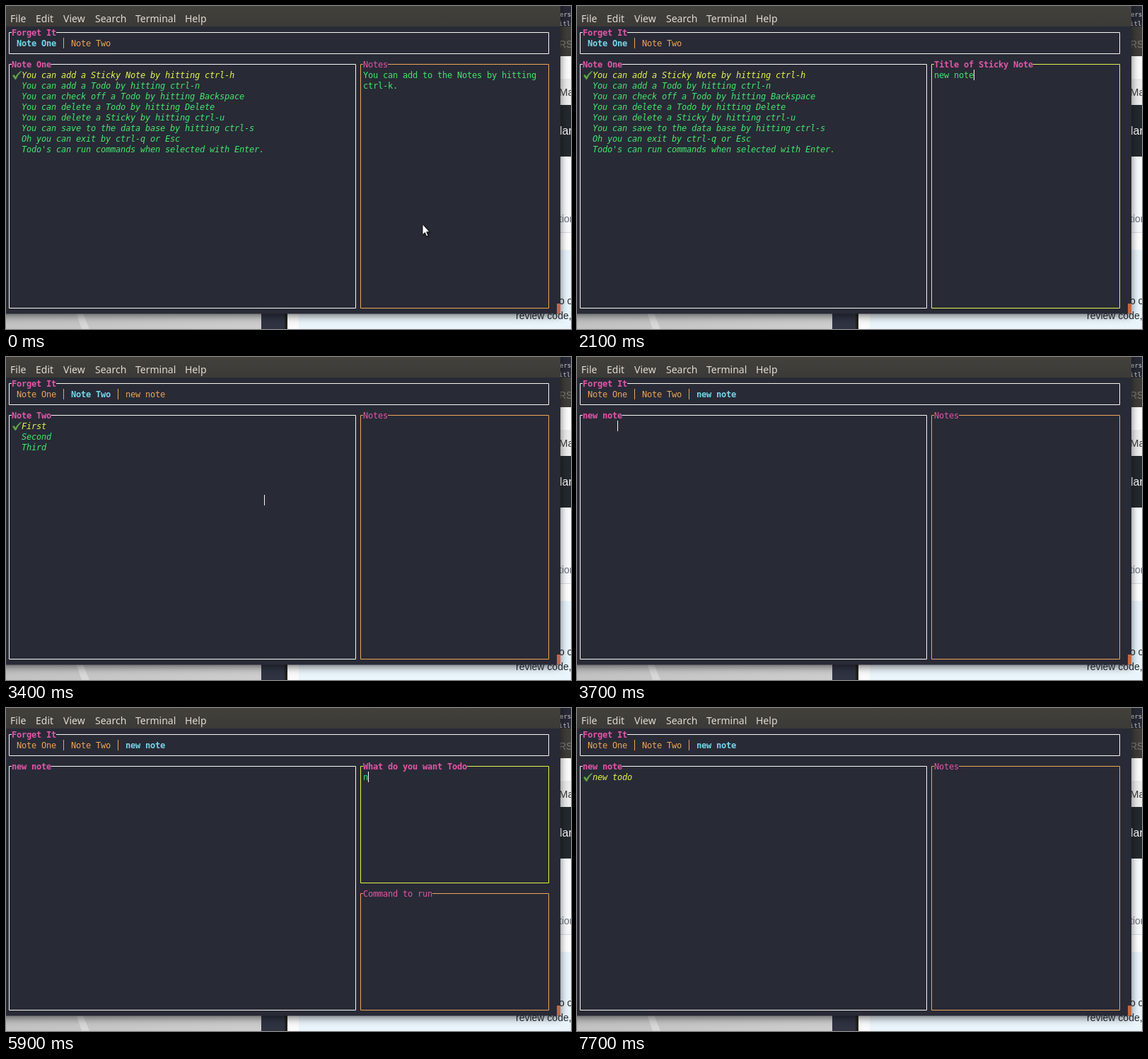
Write an HTML page that moves like this. It is 799 px wide and 457 px high and loops after 8 s.

```html
<!DOCTYPE html>
<html lang="en">
<head>
<meta charset="utf-8">
<title>Sticky notes in a terminal</title>
<style>
  html, body { margin: 0; width: 100%; height: 100%; overflow: hidden; background: #282a36; }
  svg { display: block; width: 799px; height: 457px; }
  text { white-space: pre; }
  .term text {
    font: 12px "DejaVu Sans Mono", monospace;
    letter-spacing: calc(7px - 1ch);
  }
  .term .b { font-weight: bold; }
  .term .i { font-style: italic; }
  .menu text { font: 14px "Noto Sans", "Open Sans", sans-serif; fill: #dfdbd2; }
  .page text { font: 14px "Liberation Sans", sans-serif; }
  .page .code { font: 9px "DejaVu Sans Mono", monospace; fill: #d5d5d0; }
  .win { filter: drop-shadow(0 3px 6px rgba(0, 0, 0, .55)); }
</style>
</head>
<body>
<svg viewBox="0 0 799 457">
  <defs>
    <linearGradient id="desk"><stop stop-color="#c2c2c2"/><stop offset="1" stop-color="#cdcdcd"/></linearGradient>
    <linearGradient id="bar" x2="0" y2="1"><stop stop-color="#42413c"/><stop offset="1" stop-color="#3b3a36"/></linearGradient>
  </defs>

  <g class="page">
    <rect y="430" width="361" height="27" fill="url(#desk)"/>
    <path d="M98 430h9l11 27h-11z" fill="#d8d8d8"/>
    <rect x="361" y="430" width="35" height="27" fill="#2f3342"/>
    <rect x="394" y="430" width="4" height="27" fill="#22231f"/>
    <rect x="398" y="430" width="16" height="27" fill="#fafafa"/>
    <rect x="414" y="345" width="385" height="112" fill="#eaf4fb"/>
    <rect x="770" width="29" height="29" fill="#272a36"/>
    <rect x="770" y="29" width="29" height="42" fill="#3e3d39"/>
    <rect x="770" y="71" width="29" height="32" fill="#fbfbfb"/>
    <rect x="770" y="103" width="29" height="37" fill="#ededed"/>
    <rect x="770" y="140" width="29" height="73" fill="#24292e"/>
    <rect x="770" y="213" width="29" height="108" fill="#f8fafc"/>
    <rect x="770" y="320" width="29" height="1" fill="#d8dce0"/>
    <rect x="770" y="321" width="29" height="24" fill="#fff"/>
    <text class="code" x="783" y="15">ers</text>
    <text class="code" x="782" y="28">itle</text>
    <text x="782" y="59" fill="#7d7b74">RS:</text>
    <text x="782" y="127" fill="#3c3c3c" style="font-size:15px">Ma</text>
    <text x="783" y="182" fill="#fff" style="font-size:16px">lan</text>
    <text x="782" y="306" fill="#6a737d">tion</text>
    <text x="778" y="422" fill="#24292e">to of</text>
    <text x="721" y="443" fill="#24292e">review code,</text>
  </g>

  <rect class="win" x="-20" y="-20" width="804" height="455.5" fill="#282a36"/>
  <rect width="784" height="29" fill="url(#bar)"/>
  <rect x="779" y="421" width="5" height="14" fill="#c4673f"/>
  <g class="menu">
    <text x="6" y="23">File</text>
    <text x="42" y="23">Edit</text>
    <text x="81" y="23">View</text>
    <text x="126" y="23">Search</text>
    <text x="183" y="23">Terminal</text>
    <text x="253" y="23">Help</text>
  </g>
  <g class="term" id="term"></g>
  <path id="mouse" d="M589 308.5v15.2l3.4-3.1 2.3 5.3 2.3-1-2.3-5.2h4.3z"
        fill="#fff" stroke="#16171d" stroke-width="1" style="filter:drop-shadow(1px 1px 1px #0008)"/>
</svg>

<script>
const LOOP = 8000;
const WHITE = '#f8f8f2', PINK = '#e356a7', GREEN = '#42e66c',
      YELLOW = '#e4f34a', CYAN = '#75d7ec', ORANGE = '#efa554';

const tabs = ['Note One', 'Note Two', 'new note'];
const todos = [
  [
    'You can add a Sticky Note by hitting ctrl-h',
    'You can add a Todo by hitting ctrl-n',
    'You can check off a Todo by hitting Backspace',
    'You can delete a Todo by hitting Delete',
    'You can delete a Sticky by hitting ctrl-u',
    'You can save to the data base by hitting ctrl-s',
    'Oh you can exit by ctrl-q or Esc',
    "Todo's can run commands when selected with Enter."
  ],
  ['First', 'Second', 'Third'],
  ['new todo']
];
const notes = ['You can add to the Notes by hitting', 'ctrl-k.'];

// [start, open tab, right panel, typed text, caret column, caret row]
const steps = [
  [0, 0, 'notes', ''],
  [500, 0, 'sticky', ''],
  [1200, 0, 'sticky', 'n', 72, 4],
  [1300, 0, 'sticky', 'new', 74, 4],
  [1500, 0, 'sticky', 'new ', 75, 4],
  [1800, 0, 'sticky', 'new no', 77, 4],
  [2000, 0, 'sticky', 'new not', 78, 4],
  [2100, 0, 'sticky', 'new note', 79, 4],
  [2400, 0, 'notes', ''],
  [3400, 1, 'notes', '', 51, 11],
  [3700, 2, 'notes', '', 7, 4],
  [4600, 2, 'todo', ''],
  [5300, 2, 'todo', 'b', 72, 4],
  [5600, 2, 'todo', '', 72, 4],
  [5900, 2, 'todo', 'n', 72, 4],
  [6000, 2, 'todo', 'ne', 73, 4],
  [6100, 2, 'todo', 'new', 74, 4],
  [6300, 2, 'todo', 'new ', 75, 4],
  [6700, 2, 'todo', 'new t', 76, 4],
  [6800, 2, 'todo', 'new to', 77, 4],
  [7000, 2, 'todo', 'new tod', 78, 4],
  [7100, 2, 'todo', 'new todo', 79, 4],
  [7700, 2, 'notes', '']
];

// Character grid: 7 by 15 pixel cells
const colX = c => 1 + 7 * c;
const rowY = r => 30 + 15 * r;

const put = (c, r, str, color, cls = '') =>
  `<text x="${colX(c)}" y="${rowY(r) + 12}" fill="${color}" class="${cls}">${str}</text>`;

const bar = (x, r, color) =>
  `<rect x="${x}" y="${rowY(r)}" width="1" height="15" fill="${color}"/>`;

function box(c0, r0, c1, r1, title, color, cls = 'b') {
  const [l, r] = [c0, c1].map(c => colX(c) + 3.5);
  const [t, b] = [r0, r1].map(n => rowY(n) + 7.5);
  const from = colX(c0 + 1 + title.length);
  return `<path d="M${from} ${t}H${r}V${b}H${l}V${t}H${colX(c0 + 1)}" fill="none" stroke="${color}"/>`
    + put(c0 + 1, r0, title, PINK, cls);
}

const check =
  '<path d="M9.2 98.6Q10.4 96.8 11.8 97.5L13.3 100Q17 94 21.6 91.8Q22.4 92 21.8 92.8Q17 97.5 14.6 103Q13.6 104.5 12.4 103.5z" fill="#5fa345"/>';

function header(open, count) {
  let out = box(0, 0, 109, 2, 'Forget It', WHITE);
  tabs.slice(0, count).forEach((name, i) => {
    const c = 2 + 11 * i;
    if (i) out += bar(colX(c - 2) + 3, 1, ORANGE);
    out += put(c, 1, name, i === open ? CYAN : ORANGE, i === open ? 'b' : '');
  });
  return out;
}

function list(open, filled) {
  let out = box(0, 3, 70, 26, tabs[open], WHITE);
  if (filled) {
    todos[open].forEach((s, i) => out += put(3, 4 + i, s, i ? GREEN : YELLOW, 'i'));
    out += check;
  }
  return out;
}

function panel(kind, open, typed) {
  if (kind === 'notes') {
    const lines = open ? [] : notes;
    return box(71, 3, 109, 26, 'Notes', ORANGE, '')
      + lines.map((s, i) => put(72, 4 + i, s, GREEN)).join('');
  }
  const text = put(72, 4, typed, GREEN);
  if (kind === 'sticky') return box(71, 3, 109, 26, 'Title of Sticky Note', YELLOW) + text;
  return box(71, 3, 109, 14, 'What do you want Todo', YELLOW) + text
    + box(71, 15, 109, 26, 'Command to run', ORANGE, '');
}

const term = document.getElementById('term');
const mouse = document.getElementById('mouse');
let shown = null;

function draw(step) {
  const [at, open, kind, typed, col, row] = step;
  term.innerHTML = header(open, at < 2400 ? 2 : 3)
    + list(open, open < 2 || at >= 7700)
    + panel(kind, open, typed)
    + (col === undefined ? '' : bar(colX(col + 1), row, WHITE));
  mouse.style.display = at < 500 ? '' : 'none';
}

const start = performance.now();
function tick() {
  const t = (performance.now() - start) % LOOP;
  const step = steps.findLast(s => s[0] <= t);
  if (step !== shown) draw(shown = step);
  requestAnimationFrame(tick);
}
tick();
</script>
</body>
</html>
```
